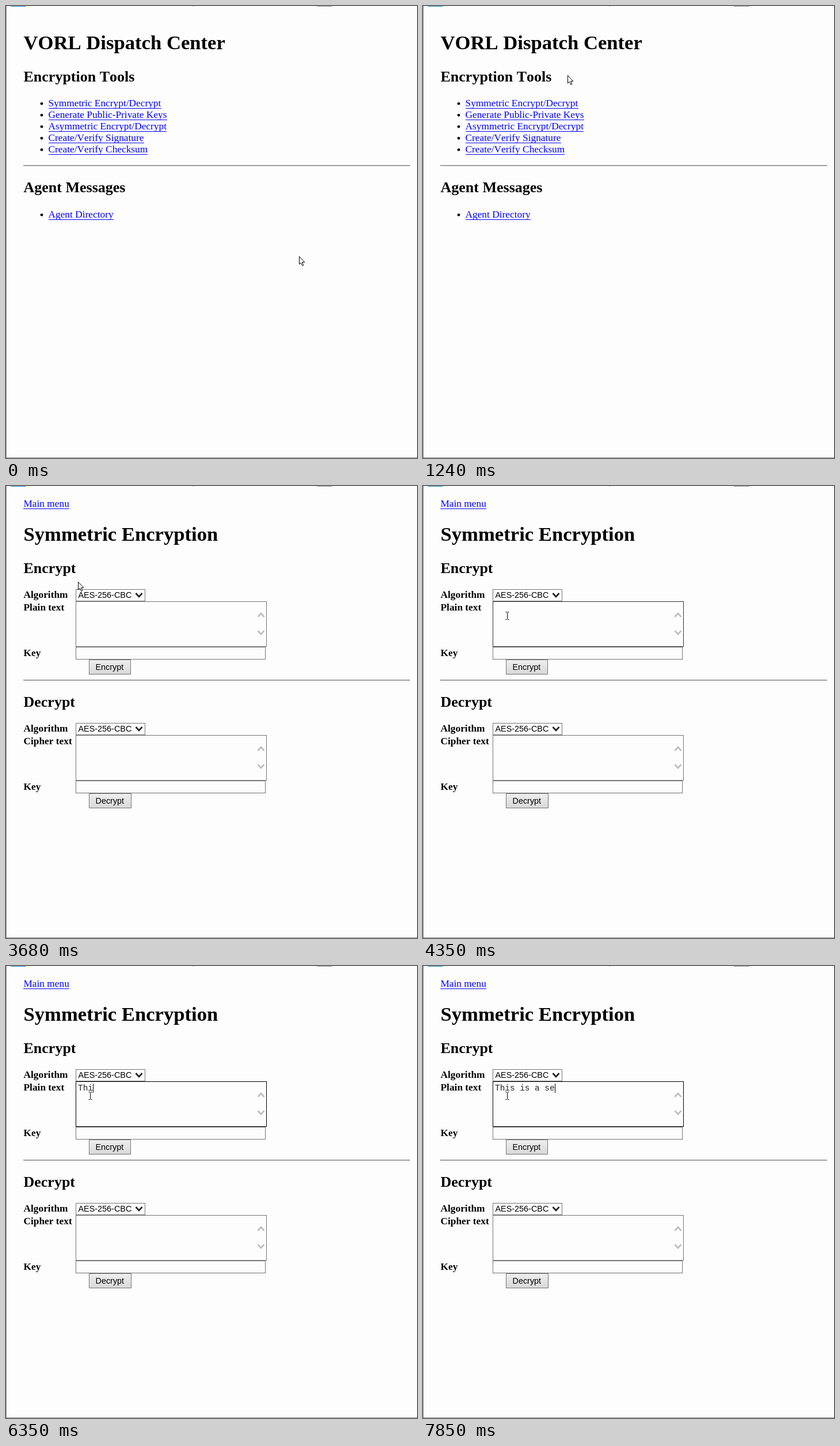
Animation, 714 px wide and 784 px high, one loop 8000 ms. Source, as an HTML page:

```html
<!DOCTYPE html>
<html lang="en">
<head>
<meta charset="utf-8">
<title>Message tools</title>
<style>
html, body { margin: 0; width: 100%; height: 100%; overflow: hidden; background: #fdfdfd; }
svg { display: block; width: 714px; height: 784px; }
text { font: 17.33px "Liberation Serif", serif; font-kerning: none; white-space: pre; }
.h1 { font-size: 34.67px; font-weight: bold; }
.h2 { font-size: 26px; font-weight: bold; }
.label { font-weight: bold; }
.link { fill: #00f; }
.ui { font: 14.4px "Liberation Sans", sans-serif; font-kerning: none; }
.mono { font: 14.4px "Liberation Mono", monospace; fill: #222; }
.box { fill: #fdfdfd; stroke: #757575; }
.chevron { fill: none; stroke-width: 2.6; }
.pointer { fill: #fff; stroke: #000; stroke-width: 1; }
</style>
</head>
<body>
<svg viewBox="0 0 714 784">
  <defs>
    <linearGradient id="face" x2="0" y2="1">
      <stop stop-color="#eee"/><stop offset="1" stop-color="#d8d8d8"/>
    </linearGradient>
  </defs>
  <rect width="714" height="784" fill="#fdfdfd"/>
  <path d="M.5 0V784M0 783.5H714" stroke="#8a8a8a"/>
  <path d="M8 0H34V.6H9Z" fill="#1c8ad0" stroke="#1c8ad0" stroke-width=".8"/>
  <path d="M540 .5H567M325 .5h1" stroke="#999"/>
  <g id="menu"></g>
  <g id="form"></g>
  <text id="typed" class="mono" x="125" y="216"></text>
  <rect id="caret" y="204" width="1" height="16"/>
  <path id="pointer" class="pointer"/>
</svg>
<script>
const $ = id => document.getElementById(id);

const text = (x, y, s, cls) => `<text x="${x}" y="${y}" class="${cls}">${s}</text>`;
const rule = y => `<rect x="30" y="${y}" width="672" height="1.4" fill="#7a7a7a"/>`;
const link = (x, y, w, s) => text(x, y, s, 'link') +
  `<rect class="link" x="${Math.round(x)}" y="${y + 3}" width="${w}" height="1"/>`;
const item = (y, w, s) => `<circle cx="62" cy="${y - 4.7}" r="2.4"/>` + link(73.5, y, w, s);
const box = (x, y, r, b, extra = '') =>
  `<rect class="box" x="${x + .5}" y="${y + .5}" width="${r - x - 1}" height="${b - y - 1}" ${extra}/>`;
const chevron = (x, y, dy, color) =>
  `<path class="chevron" stroke="${color}" d="M${x - 5.5} ${y - dy}L${x} ${y + dy}L${x + 5.5} ${y - dy}"/>`;

// One half of the form; y is the baseline of its heading
const section = (y, name, field, width, id) =>
  text(30.5, y, name, 'h2') +
  text(30.5, y + 43, 'Algorithm', 'label') +
  text(30.5, y + 65, field, 'label') +
  text(30.5, y + 144, 'Key', 'label') +
  box(121, y + 28, 242, y + 49) +
  text(125.5, y + 43, 'AES-256-CBC', 'ui') +
  chevron(231, y + 38, 3, '#222') +
  box(121, y + 128, 451, y + 150) +
  box(121, y + 49, 453, y + 128, `id="${id}"`) +
  chevron(443, y + 73, -3, '#bdbdbd') +
  chevron(443, y + 103, 3, '#bdbdbd') +
  box(144, y + 150, 144 + width, y + 176, 'style="fill:url(#face)"') +
  text(155.5, y + 168, name, 'ui');

$('menu').innerHTML =
  text(30.5, 75, 'VORL Dispatch Center', 'h1') +
  text(30.5, 131, 'Encryption Tools', 'h2') +
  item(174, 196, 'Symmetric Encrypt/Decrypt') +
  item(194, 206, 'Generate Public-Private Keys') +
  item(214, 205, 'Asymmetric Encrypt/Decrypt') +
  item(234, 166, 'Create/Verify Signature') +
  item(254, 172, 'Create/Verify Checksum') +
  rule(276) +
  text(30.5, 323, 'Agent Messages', 'h2') +
  item(367, 113, 'Agent Directory');

$('form').innerHTML =
  link(30.4, 36, 80, 'Main menu') +
  text(30.5, 95, 'Symmetric Encryption', 'h1') +
  section(151, 'Encrypt', 'Plain text', 73, 'plain') +
  rule(336) +
  section(383, 'Decrypt', 'Cipher text', 74, 'cipher');

const shapes = {
  arrow: 'M.5 .5V14L3.5 11.2 5.7 16.5 7.8 15.6 5.7 10.4H9.8Z',
  beam: 'M.5 .5H2.5L3.5 1.5 4.5 .5H6.5M3.5 1.5V12.5M.5 13.5H2.5L3.5 12.5 4.5 13.5H6.5',
  hand: 'M5.5 12.5V2Q5.5 .5 7 .5T8.5 2V7Q10 6.3 10.6 7.7 12 7.1 12.6 8.5 14.3 8.3 14.4 10V14.5Q14.2 17 12.5 18.5V20.5H6.5V19L1 13.5Q.2 11.8 1.6 11.2 3.2 11 5.5 14M8.5 7V11M10.6 7.7V11M12.6 8.5V11.5'
};

// [time, pointer, x, y]
const moves = [
  [0, 'arrow', 509, 434], [680, 'arrow', 522, 430], [830, 'arrow', 583, 369],
  [970, 'arrow', 478, 242], [1100, 'arrow', 366, 126], [1240, 'arrow', 251, 120],
  [1370, 'beam', 183, 132], [1520, 'arrow', 148, 152], [1650, 'arrow', 125, 165],
  [2200, 'hand', 120, 165], [3680, 'arrow', 125, 166], [4090, 'arrow', 129, 180],
  [4220, 'beam', 139, 208], [4350, 'beam', 143, 218]
];
// [time, number of typed letters]
const keys = [
  [0, 0], [5680, 1], [5940, 2], [6350, 3], [6480, 4], [6630, 5], [6890, 7],
  [7040, 8], [7170, 9], [7320, 10], [7450, 11], [7850, 12]
];
// [time, caret opacity]
const blink = [[0, 0], [4500, 1], [4760, .6], [4890, .3], [5020, 0], [5420, .5], [5550, 1]];

const at = (steps, t) => steps.findLast(s => s[0] <= t);

function draw() {
  const t = performance.now() % 8000;
  const onForm = t >= 3680;
  $('menu').style.display = onForm ? 'none' : '';
  $('form').style.display = onForm ? '' : 'none';
  $('plain').style.stroke = t >= 4500 ? '#000' : t >= 4220 ? '#333' : '';

  const n = at(keys, t)[1];
  $('typed').textContent = 'This is a se'.slice(0, n);
  $('caret').setAttribute('x', Math.round(124.85 + 8.64 * n));
  $('caret').setAttribute('opacity', at(blink, t)[1]);

  const [, kind, x, y] = at(moves, t);
  $('pointer').setAttribute('d', shapes[kind]);
  $('pointer').setAttribute('transform', `translate(${x} ${y})`);
  $('pointer').style.fill = kind === 'beam' ? 'none' : '';
  requestAnimationFrame(draw);
}
draw();
</script>
</body>
</html>
```
